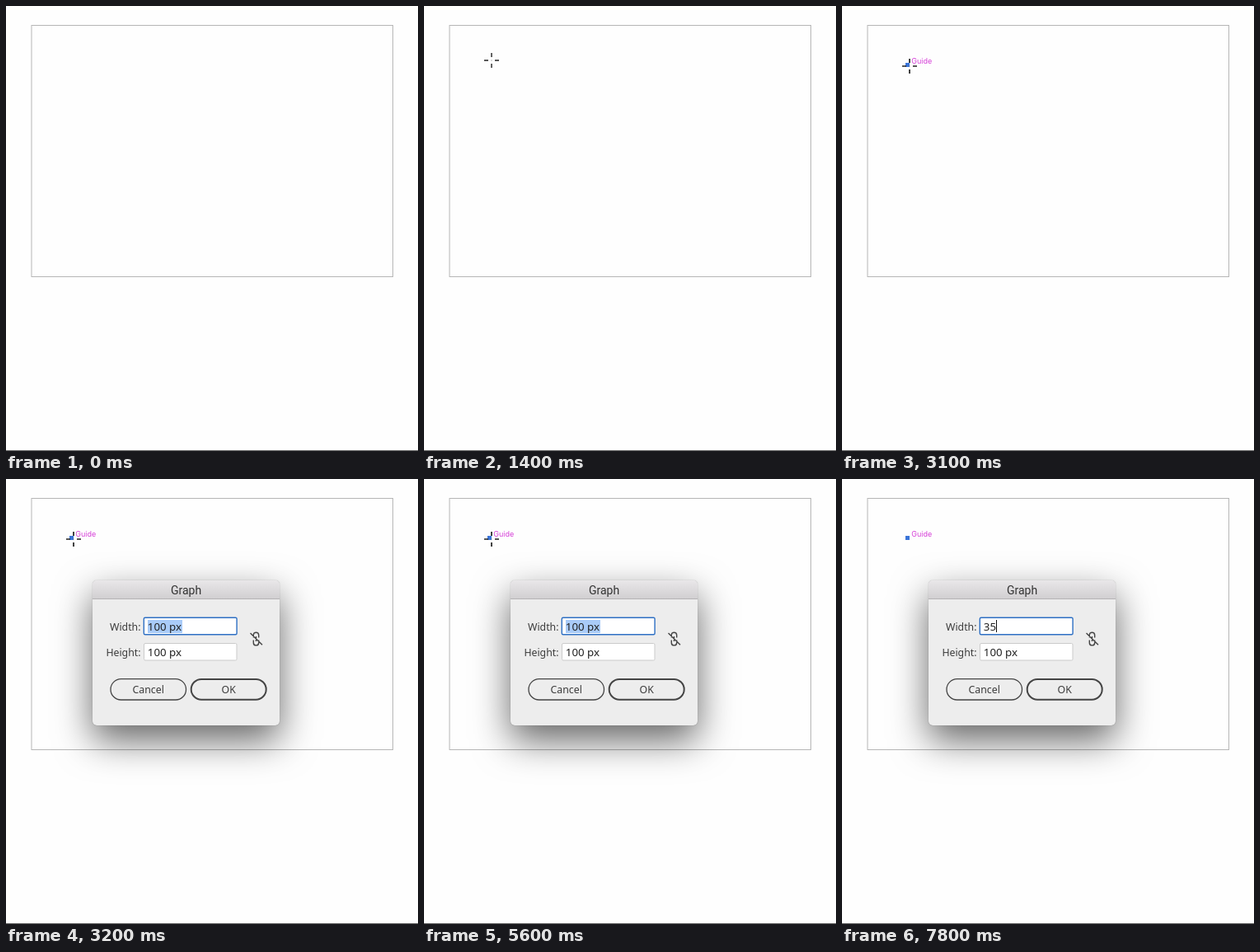
Animation of 500x540 px, one loop 8 s. Source, as an HTML page:

```html
<!DOCTYPE html>
<html lang="en">
<head>
<meta charset="utf-8">
<title>Graph size dialog</title>
<style>
  html, body { margin: 0; width: 100%; height: 100%; overflow: hidden; background: #fefefe; }
  #stage { position: relative; width: 500px; height: 540px; overflow: hidden; }
  #stage svg { position: absolute; left: 0; top: 0; display: block; }
  #dialog {
    position: absolute; left: 105px; top: 123px; width: 227px; height: 176px;
    border-radius: 5px; background: #ededed;
    box-shadow: 0 0 1px rgba(0, 0, 0, .45), 0 18px 45px rgba(0, 0, 0, .6);
  }
  .ui { font-family: "Noto Sans", sans-serif; font-size: 12.3px; fill: #3c3c3c; }
  .value { font-size: 13.3px; fill: #222; }
  .title { font-family: Roboto, sans-serif; font-size: 14px; fill: #333; }
  .guide { font-family: Inter, sans-serif; font-size: 9px; fill: #d640d8; }
  .mid { text-anchor: middle; }
  .end { text-anchor: end; }
</style>
</head>
<body>
<div id="stage">
  <svg width="500" height="540">
    <rect x="31" y="23.5" width="438.5" height="305" fill="none" stroke="#b6b6b6"/>
    <path d="M0 539.5H500" stroke="#666"/>
  </svg>

  <div id="dialog"></div>

  <svg width="500" height="540">
    <defs>
      <linearGradient id="bar" x2="0" y2="1">
        <stop stop-color="#e9e7e9"/>
        <stop offset="1" stop-color="#d0ced0"/>
      </linearGradient>
    </defs>

    <g id="form" class="ui">
      <path d="M105 146V128a5 5 0 0 1 5-5H327a5 5 0 0 1 5 5V146Z" fill="url(#bar)"/>
      <path d="M105 145.5H332" stroke="#b5b3b5"/>
      <text class="title mid" x="218.6" y="140">Graph</text>

      <text class="end" x="163.5" y="184">Width:</text>
      <rect x="167.3" y="168.3" width="112.8" height="20.5" rx="1.5" fill="#fff" stroke="#2f70c4" stroke-width="1.4"/>
      <rect id="selection" x="172" y="171" width="42" height="16" fill="#a9cbf8"/>
      <text id="width" class="value" x="171.8" y="184"></text>
      <path id="caret" d="M0 171V186" stroke="#111"/>

      <text class="end" x="163.5" y="215">Height:</text>
      <rect x="167.5" y="199.5" width="112.5" height="20.5" rx="1.5" fill="#fff" stroke="#cbcbcb"/>
      <text class="value" x="171.8" y="215">100 px</text>

      <g fill="none" stroke="#444" stroke-width="1.4">
        <path d="M300.3 192.5V189.5a3.2 3.2 0 0 1 6.4 0V192.5M300.3 195.5V198.7a3.2 3.2 0 0 0 6.4 0V195.5M303.5 191V197M296.5 187L311 201.3"/>
        <rect x="127" y="242.7" width="91.5" height="25.3" rx="12.6" stroke-width="1.3"/>
        <rect x="224.7" y="242.9" width="91" height="24.8" rx="12.4" stroke-width="2"/>
      </g>
      <text class="mid" x="172.7" y="260">Cancel</text>
      <text class="mid" x="270.2" y="260">OK</text>
    </g>

    <g id="guide">
      <rect x="77" y="69" width="5" height="5" fill="#3a74d8"/>
      <text class="guide" x="84.3" y="70">Guide</text>
    </g>
    <circle id="ring" cx="81.6" cy="72.5" fill="none" stroke="#000" stroke-width="1.6"/>
    <g id="cross" stroke="#222">
      <path d="M-9 0H-4M4 0H9M0 -9V-4M0 4V9"/>
      <path d="M-.5 0H.5" stroke="#777" stroke-width="1"/>
    </g>
  </svg>
</div>

<script>
  const LOOP = 8000, STEP = 100;
  const el = id => document.getElementById(id);
  const [dialog, form, selection, width, caret, guide, ring, cross] =
    ["dialog", "form", "selection", "width", "caret", "guide", "ring", "cross"].map(el);

  const show = (node, on) => { node.style.display = on ? "" : "none"; };

  // Ease-out between two values over a time span
  const ease = (t, t0, t1, a, b, power) => {
    const u = Math.min(1, Math.max(0, (t - t0) / (t1 - t0)));
    return a + (b - a) * (1 - (1 - u) ** power);
  };

  const crossY = t => t <= 1100
    ? ease(t, 300, 1100, -4, 58, 1.5)
    : ease(t, 1100, 1800, 58, 73, 1.36);

  function draw(t) {
    const open = t >= 3200;
    const typed = t >= 7700 ? "35" : t >= 6900 ? "3" : "";

    show(cross, t >= 300 && t < 6900);
    cross.setAttribute("transform", `translate(82 ${crossY(t).toFixed(2)})`);
    cross.setAttribute("stroke-width", t >= 3100 ? 1.7 : 1.4);

    show(ring, t >= 2600 && t < 3100);
    ring.setAttribute("r", ease(t, 2600, 3100, 30.7, 0, 1));

    show(guide, t >= 3100);
    show(dialog, open);
    show(form, open);
    show(selection, !typed);
    show(caret, typed);
    width.textContent = typed || "100 px";
    caret.setAttribute("transform", `translate(${172.3 + 7.6 * typed.length} 0)`);
  }

  const start = performance.now();
  function tick() {
    const t = (performance.now() - start) % LOOP;
    draw(Math.floor(t / STEP) * STEP);
    requestAnimationFrame(tick);
  }
  tick();
</script>
</body>
</html>
```
